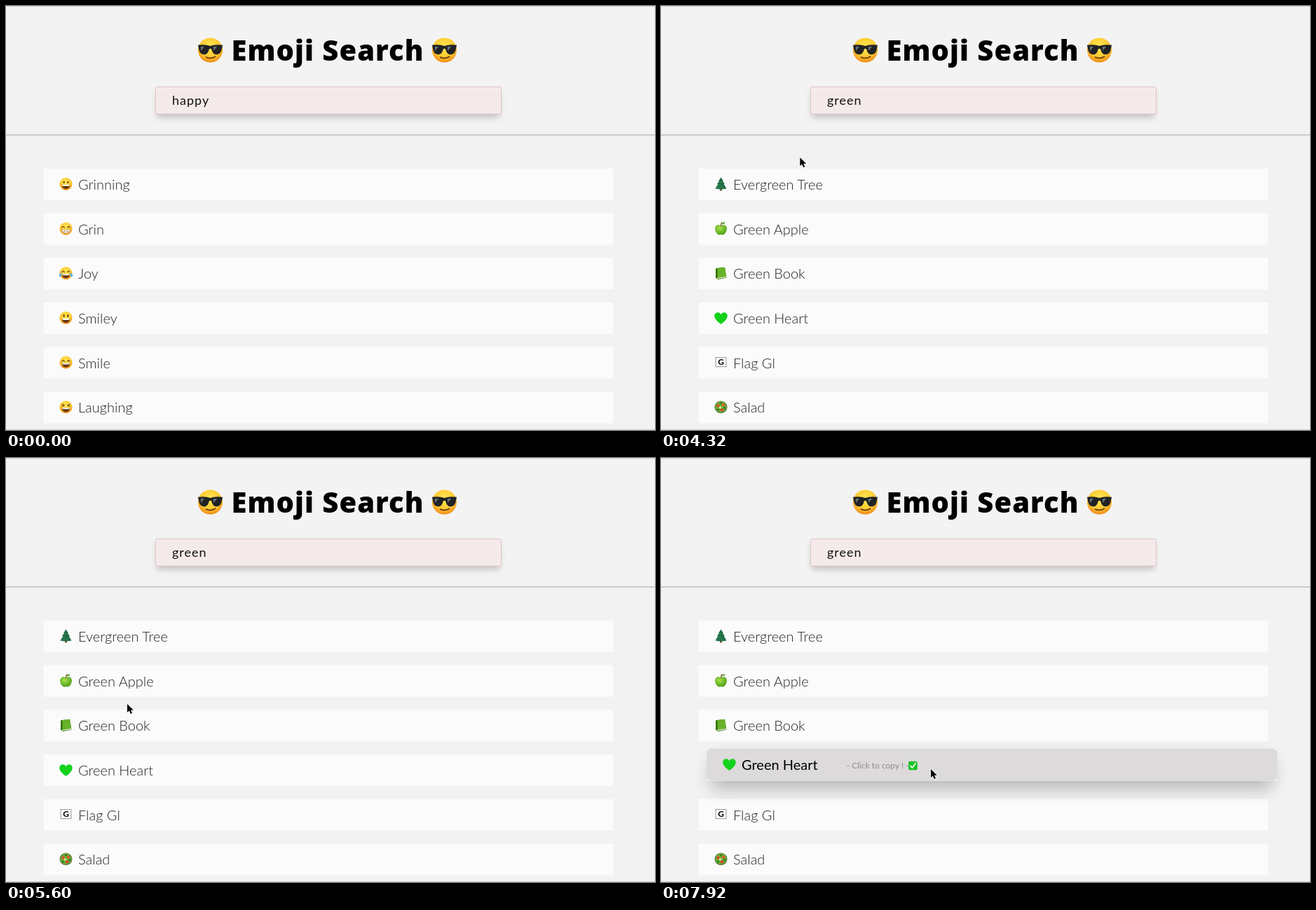
Recreate the animation shown at these times as an HTML page. Size 926 px wide and 605 px high, loop 8 s.

```html
<!DOCTYPE html>
<html lang="en">
<head>
<meta charset="utf-8">
<title>Emoji Search</title>
<style>
  html, body { margin: 0; width: 100%; height: 100%; overflow: hidden; background: #f2f2f2; }
  svg { display: block; }
  text { font-family: Lato, "Open Sans", sans-serif; white-space: pre; }
  .title { font: 800 40px "Open Sans", "Noto Sans", sans-serif; letter-spacing: 1px; }
  .query { font-size: 18px; letter-spacing: 1px; }
  .label { font-size: 20px; font-weight: 300; fill: #222; }
  .active .label { font-weight: 400; fill: #000; }
  .hint { font-size: 12px; font-weight: 400; fill: #8f8c8c; }
</style>
</head>
<body>
<svg id="stage" width="926" height="605" viewBox="0 0 926 605">
  <defs>
    <radialGradient id="sun" cx=".5" cy=".36" r=".66">
      <stop offset="0" stop-color="#ffeb55"/><stop offset=".6" stop-color="#fecb33"/><stop offset="1" stop-color="#ee8716"/>
    </radialGradient>
    <linearGradient id="fury" x2="0" y2="1">
      <stop offset="0" stop-color="#d92d1c"/><stop offset="1" stop-color="#f98a2b"/>
    </linearGradient>
    <linearGradient id="cross" x2="0" y2="1">
      <stop offset="0" stop-color="#e9793a"/><stop offset=".7" stop-color="#fec43a"/>
    </linearGradient>
    <radialGradient id="fruit" cx=".4" cy=".35" r=".7">
      <stop offset="0" stop-color="#a6e04a"/><stop offset="1" stop-color="#4a9a18"/>
    </radialGradient>
    <filter id="soft" x="-20%" y="-200%" width="140%" height="500%"><feGaussianBlur stdDeviation="12"/></filter>
    <filter id="near" x="-10%" y="-60%" width="120%" height="220%"><feGaussianBlur stdDeviation="5"/></filter>
  </defs>
  <rect width="926" height="605" fill="#f2f2f2"/>
  <g id="rows"></g>
  <rect x="-20" y="4" width="966" height="181" fill="#000" opacity=".28" filter="url(#near)" clip-path="inset(179px 0 0 0)"/>
  <rect width="926" height="183" fill="#f3f3f3"/>
  <path d="M0 .5H926M0 604.5H926" stroke="#cfcfcf"/>
  <use href="#cool" transform="translate(291.5 63) scale(1.95)"/>
  <use href="#cool" transform="translate(625.5 63) scale(1.95)"/>
  <text class="title" x="459" y="77.5" text-anchor="middle">Emoji Search</text>
  <rect x="215" y="121" width="489" height="38" fill="#000" opacity=".2" filter="url(#near)"/>
  <rect x="213.5" y="115.5" width="493" height="38.5" rx="2" fill="#f5eaea" stroke="#dfc3c8"/>
  <rect id="selection" y="123" height="24" fill="#b5d4fb"/>
  <text id="query" class="query" x="237" y="141"></text>
  <rect id="caret" y="124" width="1" height="22"/>
  <g id="pointer">
    <path id="arrow" d="M0 0V12L2.8 9.5 4.8 14 7 13 5 8.8H8.8Z" stroke="#fff" stroke-width="1.2" paint-order="stroke"/>
    <path id="beam" d="M-3-8Q0-8 0-6V6Q0 8-3 8M3-8Q0-8 0-6M0 6Q0 8 3 8" fill="none" stroke="#222"/>
  </g>
</svg>
<script>
const $ = id => document.getElementById(id);
const LOOP = 8000, STEP = 80, TOP = 231.5, PITCH = 63.65;

// Emoji glyphs, centred on the origin and about 18 units wide
const line = (d, color = '#5d3410', width = 1.1) =>
  `<path d="${d}" fill="none" stroke="${color}" stroke-width="${width}" stroke-linecap="round" stroke-linejoin="round"/>`;
const shape = (d, fill) => `<path d="${d}" fill="${fill}"/>`;
const dot = (x, y, rx, ry, fill) => `<ellipse cx="${x}" cy="${y}" rx="${rx}" ry="${ry}" fill="${fill}"/>`;
const face = (features, fill = 'url(#sun)') => dot(0, 0, 9, 9, fill) + features;
const eyes = (y = -2.5, ry = 1.6) => dot(-2.8, y, 1.1, ry, '#5d3410') + dot(2.8, y, 1.1, ry, '#5d3410');
const arcEyes = line('M-5.5-1.5Q-3.8-4.5-2-1.5M2-1.5Q3.8-4.5 5.5-1.5');
const squint = line('M-5.5-4L-2.2-2.4-5.5-1M5.5-4L2.2-2.4 5.5-1');
const laugh = shape('M-5.8 1H5.8Q5.4 7 0 7T-5.8 1Z', '#66360f') + shape('M-5.3 1H5.3L4.7 3H-4.7Z', '#fff');
const teeth = shape('M-6 1.2Q0 2 6 1.2Q5.6 6.6 0 6.6T-6 1.2Z', '#fff') +
  line('M-6 1.2Q0 2 6 1.2Q5.6 6.6 0 6.6T-6 1.2ZM-5 4H5M-2 2V6M2 2V6', '#9c7440', .5);
const frown = line('M-3.5 5.5Q0 2.5 3.5 5.5');
const brows = line('M-5.5-3.2L-1.5-1.4M5.5-3.2L1.5-1.4') + eyes(-.4, 1.2);

const glyphs = {
  cool: face(
    shape('M-9-3.7Q-4-4.6 0-3.1Q4-4.6 9-3.7L8.6-1.9Q8 3.2 4.6 3.2Q1.7 3.2.9-.7Q0-1.5-.9-.7Q-1.7 3.2-4.6 3.2Q-8 3.2-8.6-1.9Z', '#202225') +
    shape('M-7-2.5L-4.4-2.7-6.8.6ZM2.2-2.5L5-2.7 2.5.5Z', '#68747a') + line('M-3 5.2Q.5 6.8 3.6 4.7', '#6b3b0f', .9)),
  grinning: face(eyes() + laugh),
  grimacing: face(eyes() + '<rect x="-5.5" y="1.5" width="11" height="4.5" rx="2" fill="#fff" stroke="#8a6232" stroke-width=".6"/>' +
    line('M-5 3.8H5M-2.5 1.8V5.7M0 1.8V5.7M2.5 1.8V5.7', '#9c7440', .5)),
  grin: face(arcEyes + teeth),
  joy: face(arcEyes + laugh) + shape('M-6-.5Q-10 1-9.8 3.8Q-8.5 6.5-6.6 4Z', '#4fb4ee') + shape('M6-.5Q10 1 9.8 3.8Q8.5 6.5 6.6 4Z', '#4fb4ee'),
  smiley: face(eyes(-3, 2) + laugh),
  smile: face(arcEyes + laugh),
  laughing: face(squint + laugh),
  angry: face(brows + frown, 'url(#cross)'),
  rage: face(brows + frown, 'url(#fury)'),
  persevere: face(squint + line('M-6-5.5L-3-6.3M6-5.5L3-6.3', '#94570f', .8) + line('M-3.5 5.2Q-1.8 2.2 0 4T3.5 5')),
  tree: shape('M-1.4 5H1.4V9.5H-1.4Z', '#6f4523') +
    shape('M0-9.5L3.5-4 2.5-4 5.5 0 4.2.2 8 6.5Q0 8.5-8 6.5L-4.2.2-5.5 0-2.5-4-3.5-4Z', '#1e6d43') +
    line('M-2-3L1.5-2M-4 1.5L2 2.5M-5 5L4 5.3', '#3b9563', .8),
  apple: shape('M0-4Q4-7 7.5-3.5Q10 1 6 6.5Q3.5 10 0 8.3Q-3.5 10-6 6.5Q-10 1-7.5-3.5Q-4-7 0-4Z', 'url(#fruit)') +
    line('M0-4Q0-7 1.5-9', '#76502a', 1.2) + shape('M1-6.5Q2-9.5 6-9Q5-6 1-6.5Z', '#3f8f1e'),
  book: shape('M-7.5-7L5.5-8.5 8 6.5-4.5 9-7.5 7Z', '#3c7f17') + shape('M-5-7.4L5.5-8.5 7.5 4.5-4.6 6.6Z', '#67b22a') +
    line('M-5.5 7.3L7.4 5.4', '#f4f1de', 1.2) + line('M-5.8-6.6L-5.6 6', '#2f6712', .8),
  heart: shape('M0 9Q-9 3.2-9.3-2.4Q-9.1-7.5-4.7-7.7Q-1.3-7.6 0-4.6Q1.3-7.6 4.7-7.7Q9.1-7.5 9.3-2.4Q9 3.2 0 9Z', '#13d21c'),
  flag: '<rect x="-7.5" y="-7" width="15" height="13" fill="none" stroke="#222" stroke-width=".9" stroke-dasharray="1.2 1.2"/>' +
    '<text y="3.4" text-anchor="middle" font-size="12" font-weight="700">G</text>',
  salad: dot(0, 0, 9, 8.8, '#5b7d39') + dot(0, -.3, 7.8, 7.5, '#6cae35') +
    dot(-4, -2, 2.1, 2.1, '#e04a2c') + dot(3.6, -3, 2.2, 2, '#e5582e') + dot(1.6, 4, 2.3, 1.9, '#d9432b') +
    dot(-1, .6, 1.8, 1.6, '#f2e4a2') + dot(-4, 3.7, 1.5, 1.3, '#2e7021') + dot(5.2, 1.2, 1.4, 1.6, '#2e7021') + dot(0, -5.3, 1.6, 1.2, '#2e7021'),
  check: '<rect x="-6.3" y="-6.3" width="12.6" height="12.6" rx="2" fill="#16c321"/>' + line('M-3.5.3L-1 3.2 3.7-3.5', '#fff', 1.8)
};
document.querySelector('defs').insertAdjacentHTML('beforeend',
  Object.entries(glyphs).map(([id, art]) => `<g id="${id}">${art}</g>`).join(''));

const entry = s => [s.toLowerCase(), s];
const happy = ['Grinning', 'Grin', 'Joy', 'Smiley', 'Smile', 'Laughing'].map(entry);
const all = ['Grinning', 'Grimacing', 'Grin', 'Joy', 'Smiley', 'Smile'].map(entry);
const growl = ['Grinning', 'Grimacing', 'Grin', 'Angry', 'Rage', 'Persevere'].map(entry);
const green = [['tree', 'Evergreen Tree'], ['apple', 'Green Apple'], ['book', 'Green Book'],
  ['heart', 'Green Heart'], ['flag', 'Flag Gl'], ['salad', 'Salad']];

const typing = [[0, 'happy', happy], [2480, '', all], [3040, 'g', all], [3200, 'gr', growl],
  [3280, 'gre', green], [3440, 'gree', green], [3600, 'green', green]];
// time, x, y of the pointer tip
const path = [[720, 914, 70], [1040, 694, 101], [1280, 640, 101], [1440, 378, 104], [1840, 320, 135],
  [1920, 320, 135], [2240, 232, 135], [3920, 232, 136], [4480, 190, 236], [4800, 160, 255], [4960, 156, 258],
  [5040, 155, 259], [5360, 173, 351], [5600, 173, 351], [6000, 200, 423], [6080, 201, 425],
  [6400, 225, 430], [7120, 385, 444]];
const hovers = [[0, 4440, 5120], [1, 5160, 5320], [2, 5660, 5820], [3, 5820, 1e5]];
const blinks = [4000, 4500, 5040, 5640, 6160, 6640];
const CLICK = 6960, FADE = 200;

const clamp = v => Math.max(0, Math.min(1, v));
const ease = v => v * v * (3 - 2 * v);
const show = (node, on) => node.setAttribute('display', on ? 'inline' : 'none');

function pointerAt(t) {
  const next = path.findIndex(k => k[0] > t);
  if (next < 0) return path.at(-1).slice(1);
  if (!next) return path[0].slice(1);
  const [a, b] = [path[next - 1], path[next]];
  const u = ease((t - a[0]) / (b[0] - a[0]));
  return [a[1] + (b[1] - a[1]) * u, a[2] + (b[2] - a[2]) * u];
}

function hoverAt(t, row) {
  const [, from, to] = hovers.find(h => h[0] === row) || [0, 1e6, 1e6];
  return ease(clamp((t - from) / FADE)) * (1 - ease(clamp((t - to) / FADE)));
}

const rows = happy.map(() => {
  const g = document.createElementNS('http://www.w3.org/2000/svg', 'g');
  g.innerHTML = `
    <rect class="shadow" x="59" y="14" width="802" height="44" rx="8" opacity="0" filter="url(#soft)"/>
    <rect x="53" width="814" height="46" rx="2" fill="#fbfbfb" stroke="#efefef" stroke-width=".6"/>
    <rect class="tint" x="53" width="814" height="46" rx="6" fill="#dddadb" opacity="0"/>
    <use x="85.5" y="22.5"/>
    <text class="label" x="103" y="30.5"><tspan class="name"></tspan><tspan class="hint" dx="41" dy="-2">- Click to copy ! -</tspan></text>
    <use class="tick" href="#check" x="347.5" y="24.5"/>`;
  $('rows').append(g);
  const part = q => g.querySelector(q);
  return { g, shadow: part('.shadow'), tint: part('.tint'), icon: part('use'), name: part('.name'), hint: part('.hint'), tick: part('.tick') };
});

function drawRow(row, i, t, list) {
  const h = hoverAt(t, i), { g } = row;
  row.h = h;
  g.setAttribute('transform', `translate(${12 * h} ${TOP + PITCH * i - 8 * h})`);
  g.setAttribute('class', h > .5 ? 'active' : '');
  row.shadow.setAttribute('opacity', .24 * h);
  row.tint.setAttribute('opacity', h);
  row.icon.setAttribute('href', '#' + list[i][0]);
  row.name.textContent = list[i][1];
  row.hint.setAttribute('fill-opacity', h);
  show(row.tick, i === 3 && t >= CLICK);
}

function draw(t) {
  const [, typed, list] = typing.findLast(k => k[0] <= t);
  rows.forEach((row, i) => drawRow(row, i, t, list));
  $('rows').append(...[...rows].sort((a, b) => a.h - b.h).map(r => r.g));

  const query = $('query');
  query.textContent = typed || 'Search for emoji...';
  query.setAttribute('fill', typed ? '#111' : '#a39a9b');
  const width = typed ? query.getComputedTextLength() : 0;
  $('caret').setAttribute('x', 237 + width);
  const lit = blinks.filter(b => b <= t).length % 2 === 0;
  show($('caret'), t >= 2480 && t < CLICK && lit);

  const [x, y] = pointerAt(t);
  const left = Math.max(237, x), picked = t >= 2000 && t < 2480 ? Math.max(0, 237 + width - left) : 0;
  $('selection').setAttribute('x', left);
  $('selection').setAttribute('width', picked);

  const overInput = x > 213 && x < 707 && y > 115 && y < 154;
  $('pointer').setAttribute('transform', `translate(${x} ${y})`);
  show($('pointer'), t >= 720 && t < 2480 || t >= 4000);
  show($('arrow'), !overInput);
  show($('beam'), overInput);
}

const start = performance.now();
function tick() {
  const t = (performance.now() - start) % LOOP;
  draw(Math.floor(t / STEP) * STEP);
  requestAnimationFrame(tick);
}
tick();
</script>
</body>
</html>
```
